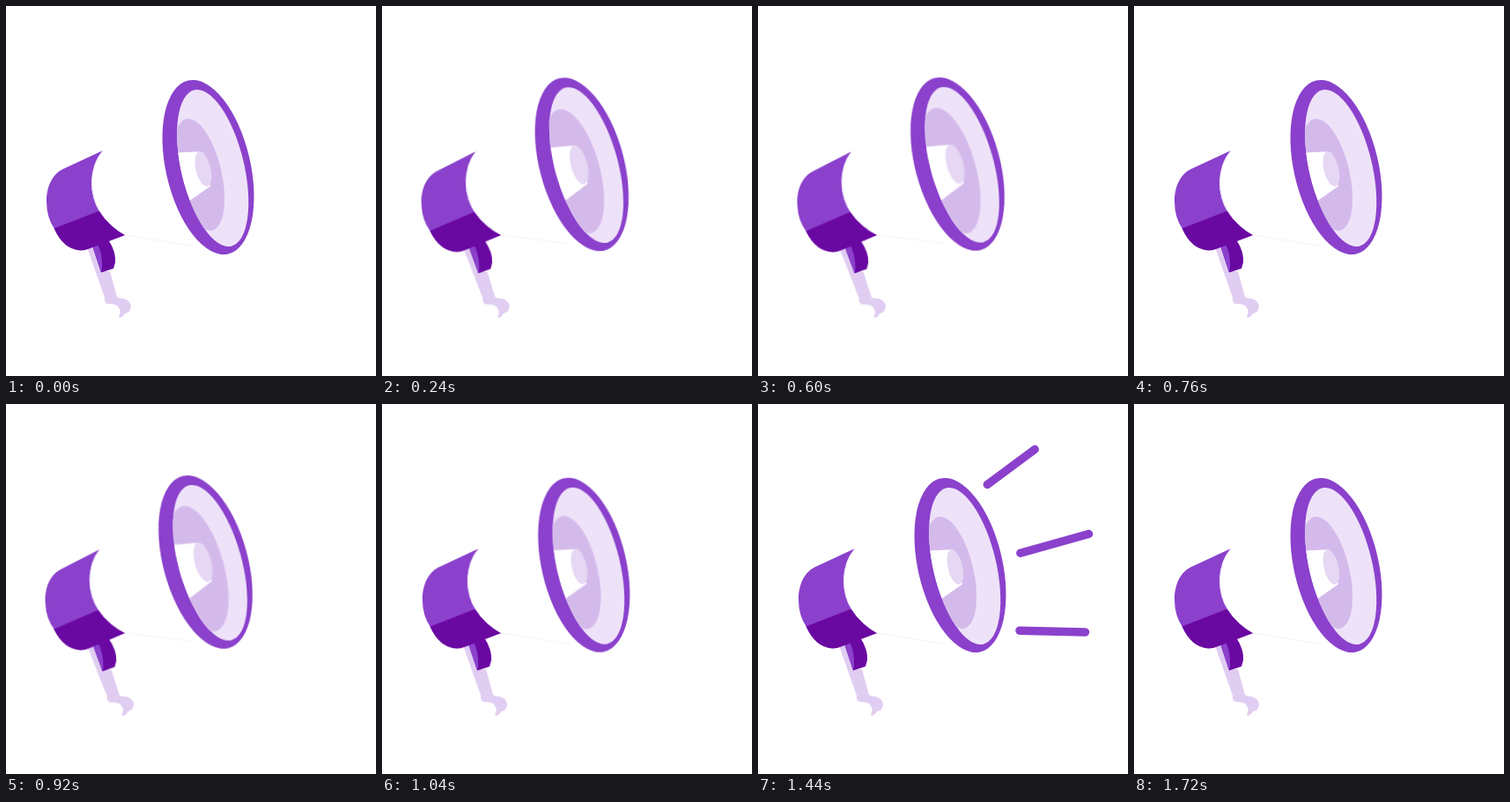
Write an HTML page that moves like this. It is 420 by 420 pixels and loops after 1760 ms.

```html
<!DOCTYPE html>
<html lang="en">
<head>
<meta charset="utf-8">
<title>Megaphone</title>
<style>
  :root {
    --main: #8b41cc;
    --dark: #6a08a2;
    --loop: 1760ms infinite;
    --ease: cubic-bezier(.6, 0, .4, 1);
  }
  html, body { margin: 0; width: 100%; height: 100%; overflow: hidden; background: #fff; }
  svg { display: block; width: 100%; height: 100%; }

  .horn { transform-origin: 135px 260px; animation: tilt var(--loop) var(--ease); }
  .cone { transform-origin: 221px 189px; animation: swell var(--loop) var(--ease); }
  .rays {
    stroke: var(--main);
    stroke-width: 9.4;
    stroke-linecap: round;
    animation: show var(--loop) step-end;
  }
  .rays line { stroke-dasharray: 1 3; animation: sweep var(--loop) ease-in-out; }

  @keyframes tilt {
    0%, 7.955%, 25%, 43.182%, 61.364%, 100% { transform: rotate(0deg); }
    15.909%, 34.091%, 52.273% { transform: rotate(-2.2deg); }
  }
  @keyframes swell {
    0%, 7.955%, 25%, 43.182%, 61.364%, 100% { transform: translate(0, 0) scale(1); }
    15.909%, 34.091%, 52.273% { transform: translate(2.5px, -1.5px) scale(1.13); }
  }
  @keyframes sweep {
    0%, 61.364% { stroke-dashoffset: 1; }
    77.045% { stroke-dashoffset: 0; }
    97.727%, 100% { stroke-dashoffset: -1; }
  }
  @keyframes show {
    0% { opacity: 0; }
    61.5% { opacity: 1; }
    97.7%, 100% { opacity: 0; }
  }
</style>
</head>
<body>
<svg viewBox="0 0 420 420">
  <defs>
    <clipPath id="mouth">
      <ellipse cx="234.7" cy="184" rx="35.7" ry="91.1" transform="rotate(-13.3 234.7 184)"/>
    </clipPath>
  </defs>

  <g class="horn">
    <!-- handle and trigger -->
    <path fill="#e0cdf1" d="M92 274L102 271L110 301L118 301L126 330Q128 332 133 332Q141 334 142 341Q141 348 135 349Q133 353 129 354L128 352Q132 346 126 340Q122 338 115 338Q111 336 112 331Z"/>
    <path fill="var(--dark)" d="M98 272L116 265Q125 279 124 291L122 298L108 302.500Z"/>
    <path fill="var(--main)" d="M98 272L104 270Q110 282 109 298L108 302.500Z"/>

    <!-- body -->
    <path fill="var(--main)" d="M110 164L67 184C52 190 46 206 46 222Q46 240 55 253L106 233Q97 219 97 200Q98 178 110 164Z"/>
    <path fill="var(--dark)" d="M54.500 252.500L106 232.500Q117 250 135.500 260L97 274.500Q89 278 84 277.500Q65 276 54.500 252.500Z"/>
    <path fill="none" stroke="#eadff6" d="M110 164Q98 178 97.500 200Q98 219 106.500 233Q117 250 135.500 260"/>
    <path stroke="#f4f3f6" d="M135.500 260L212 272.500"/>

    <!-- rim and mouth -->
    <ellipse cx="229.500" cy="183" rx="48" ry="101" fill="var(--main)" transform="rotate(-13 229.500 183)"/>
    <g clip-path="url(#mouth)">
      <rect x="170" y="80" width="120" height="210" fill="#eee2f9"/>
      <g class="cone">
        <ellipse cx="219.300" cy="191.500" rx="25.500" ry="65" fill="#d4baeb" transform="rotate(-13 219.300 191.500)"/>
        <path fill="#fff" d="M175 167.500L220 165.300L232 204.500L190 234Z"/>
        <ellipse cx="223.800" cy="185" rx="8.300" ry="20.300" fill="#e6d7f4" transform="rotate(-13 223.800 185)"/>
      </g>
    </g>
  </g>

  <g class="rays">
    <line pathLength="1" x1="253.500" y1="96.500" x2="314.200" y2="51.500"/>
    <line pathLength="1" x1="288" y1="172" x2="375.500" y2="147.500"/>
    <line pathLength="1" x1="287.500" y1="257" x2="371.500" y2="259"/>
  </g>
</svg>
</body>
</html>
```
